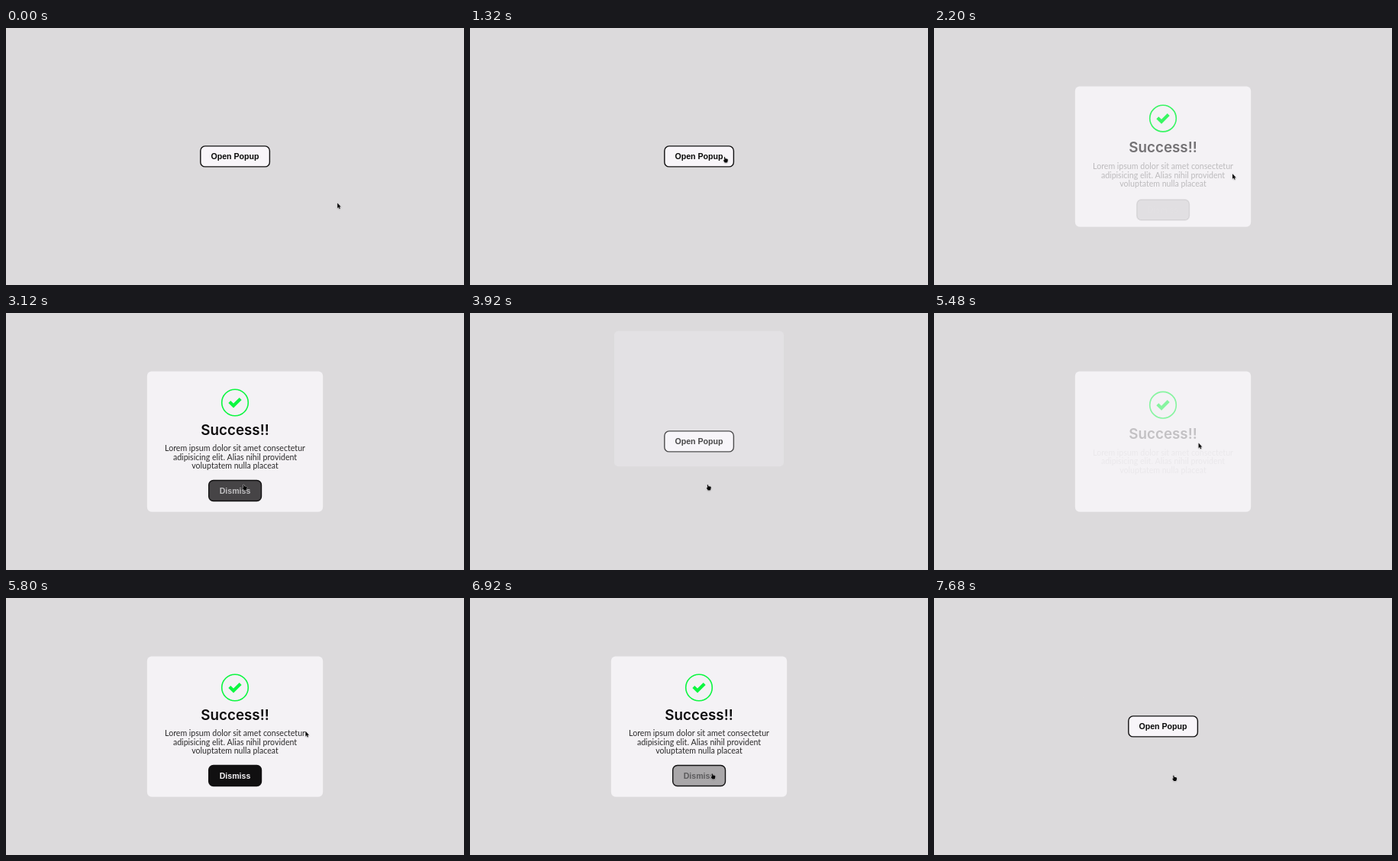
Write an HTML page with a canvas that moves like this. It is 600x337 px and loops after 8 s.

```html
<!DOCTYPE html>
<html lang="en">
<head>
<meta charset="utf-8">
<title>Popup</title>
<style>
  html, body { margin: 0; width: 100%; height: 100%; overflow: hidden; background: #dcdadc; }
  canvas { display: block; }
</style>
</head>
<body>
<canvas id="stage" width="600" height="337"></canvas>
<script>
const ctx = document.getElementById('stage').getContext('2d');
const LOOP = 8000, STEP = 40;
const PAPER = '#f4f2f5', INK = '#111011', GREEN = '#0cf740';
const CENTER = { x: 300, y: 168.7 };
const openButton = { x: 254.8, y: 154.9, w: 90.6, h: 27 };
const dismissButton = { x: 265.7, y: 219.5, w: 68.8, h: 27 };

const rounds = [
  { open: 1740, hover: 3020, close: 3740 },
  { open: 5085, hover: 6740, close: 7420 }
];

// Pointer moves: start, end, destination.
const start = { x: 434.2, y: 229.6 };
const moves = [
  [740, 1320, 333.5, 169.3],
  [1960, 2270, 397.8, 193.8],
  [2860, 3110, 311.4, 225.2],
  [4220, 4680, 332.8, 169.3],
  [5320, 5800, 392.4, 174.8],
  [6220, 7040, 313.8, 232.8]
];

const clamp = v => Math.max(0, Math.min(1, v));
const mix = (a, b, p) => a + (b - a) * p;

function bezier(x1, y1, x2, y2) {
  const at = (a, b, u) => 3 * (1 - u) * (1 - u) * u * a + 3 * (1 - u) * u * u * b + u * u * u;
  return value => {
    const x = clamp(value);
    if (x === 0 || x === 1) return x;
    let lo = 0, hi = 1;
    for (let i = 0; i < 24; i++) {
      const mid = (lo + hi) / 2;
      if (at(x1, x2, mid) < x) lo = mid; else hi = mid;
    }
    return at(y1, y2, lo);
  };
}
const easeInOut = bezier(0.42, 0, 0.58, 1);
const springy = bezier(0.18, 0.89, 0.43, 1.19);

function box(r, radius, fill, stroke) {
  ctx.beginPath();
  ctx.roundRect(r.x, r.y, r.w, r.h, radius);
  ctx.fillStyle = fill;
  ctx.fill();
  if (stroke) {
    ctx.strokeStyle = stroke;
    ctx.lineWidth = 1.4;
    ctx.stroke();
  }
}

function label(text, y, font, color) {
  ctx.font = font;
  ctx.textAlign = 'center';
  ctx.fillStyle = color;
  ctx.fillText(text, CENTER.x, y);
}

const buttonFont = 'bold 10.6px "Liberation Sans", Arial, sans-serif';

function drawIcon() {
  ctx.strokeStyle = GREEN;
  ctx.lineWidth = 1.6;
  ctx.beginPath();
  ctx.arc(300, 117.5, 17.3, 0, Math.PI * 2);
  ctx.stroke();
  ctx.lineWidth = 4.2;
  ctx.lineJoin = 'miter';
  ctx.beginPath();
  ctx.moveTo(292.8, 116.6);
  ctx.lineTo(298, 121.6);
  ctx.lineTo(307.2, 112.4);
  ctx.stroke();
}

function drawTitle() {
  label('Success!!', 160.3, '600 18.8px Inter, sans-serif', '#0c0b0c');
}

function drawDescription() {
  [
    'Lorem ipsum dolor sit amet consectetur',
    'adipisicing elit. Alias nihil provident',
    'voluptatem nulla placeat'
  ].forEach((line, i) => label(line, 181 + i * 11.5, '10.6px Lato, sans-serif', '#2b2a2b'));
}

function blend(from, to, p) {
  return `rgb(${from.map((c, i) => Math.round(mix(c, to[i], p))).join(',')})`;
}

function drawDismiss(hover) {
  const dark = [17, 16, 17], light = [244, 242, 245];
  box(dismissButton, 6, blend(dark, light, hover), INK);
  label('Dismiss', 236.6, buttonFont, blend(light, dark, hover));
}

function drawContent(age, hover) {
  [drawIcon, drawTitle, drawDescription, () => drawDismiss(hover)].forEach((draw, i) => {
    const p = easeInOut((age - 250 - i * 50) / 300);
    if (p <= 0) return;
    ctx.save();
    ctx.globalAlpha = p;
    ctx.translate(0, 6 * (1 - p));
    draw();
    ctx.restore();
  });
}

function drawPopup(t, round) {
  const age = t - round.open, closing = t - round.close;
  if (age < 0 || closing >= 270) return;
  let scale = mix(0.5, 1, springy(age / 300)), lift = 0, alpha = 1;
  if (closing >= 0) {
    const p = closing / 260;
    scale = 1 - 0.087 * p ** 2.5;
    lift = 117.5 * p ** 2;
    alpha = 1 - easeInOut(closing / 280);
  }
  ctx.save();
  ctx.globalAlpha = alpha;
  ctx.translate(CENTER.x, CENTER.y - lift);
  ctx.scale(scale, scale);
  ctx.translate(-CENTER.x, -CENTER.y);
  box({ x: 184.8, y: 76.6, w: 230.4, h: 184.2 }, 6, PAPER);
  if (closing < 0) drawContent(age, easeInOut((t - round.hover) / 300));
  ctx.restore();
}

function pointerAt(t) {
  let { x, y } = start;
  for (const [from, to, endX, endY] of moves) {
    const p = easeInOut((t - from) / (to - from));
    x = mix(x, endX, p);
    y = mix(y, endY, p);
  }
  return { x, y };
}

const inside = (p, r) => p.x >= r.x && p.x <= r.x + r.w && p.y >= r.y && p.y <= r.y + r.h;

function tracePath(points) {
  ctx.beginPath();
  points.forEach(([x, y]) => ctx.lineTo(x, y));
  ctx.closePath();
}

function drawPointer(t) {
  const p = pointerAt(t);
  ctx.save();
  ctx.translate(p.x, p.y);
  ctx.lineJoin = 'round';
  ctx.shadowColor = 'rgba(0,0,0,0.35)';
  ctx.shadowBlur = 1.5;
  ctx.shadowOffsetY = 0.5;
  if (inside(p, openButton) || inside(p, dismissButton)) {
    tracePath([[-0.6, 0], [0.5, 0], [0.9, 2], [3.6, 2.4], [4.4, 3.4], [3.9, 6.2],
      [3.1, 7.3], [0.3, 7.3], [-1.4, 4.6], [-1, 3.6], [-0.2, 3.9]]);
  } else {
    tracePath([[0, 0], [0, 6.6], [1.5, 5.3], [2.5, 7.6], [3.6, 7.1], [2.6, 5], [4.6, 5]]);
  }
  ctx.strokeStyle = 'rgba(235,233,236,0.8)';
  ctx.lineWidth = 1;
  ctx.stroke();
  ctx.shadowColor = 'transparent';
  ctx.fillStyle = '#0a0a0a';
  ctx.fill();
  ctx.restore();
}

function render(t) {
  ctx.fillStyle = '#dcdadc';
  ctx.fillRect(0, 0, 600, 337);
  box(openButton, 6, '#f8f5f9', INK);
  label('Open Popup', 172.1, buttonFont, '#080808');
  rounds.forEach(round => drawPopup(t, round));
  drawPointer(t);
}

const began = performance.now();
function tick() {
  const t = (performance.now() - began) % LOOP;
  render(Math.floor(t / STEP) * STEP);
  requestAnimationFrame(tick);
}
tick();
</script>
</body>
</html>
```
